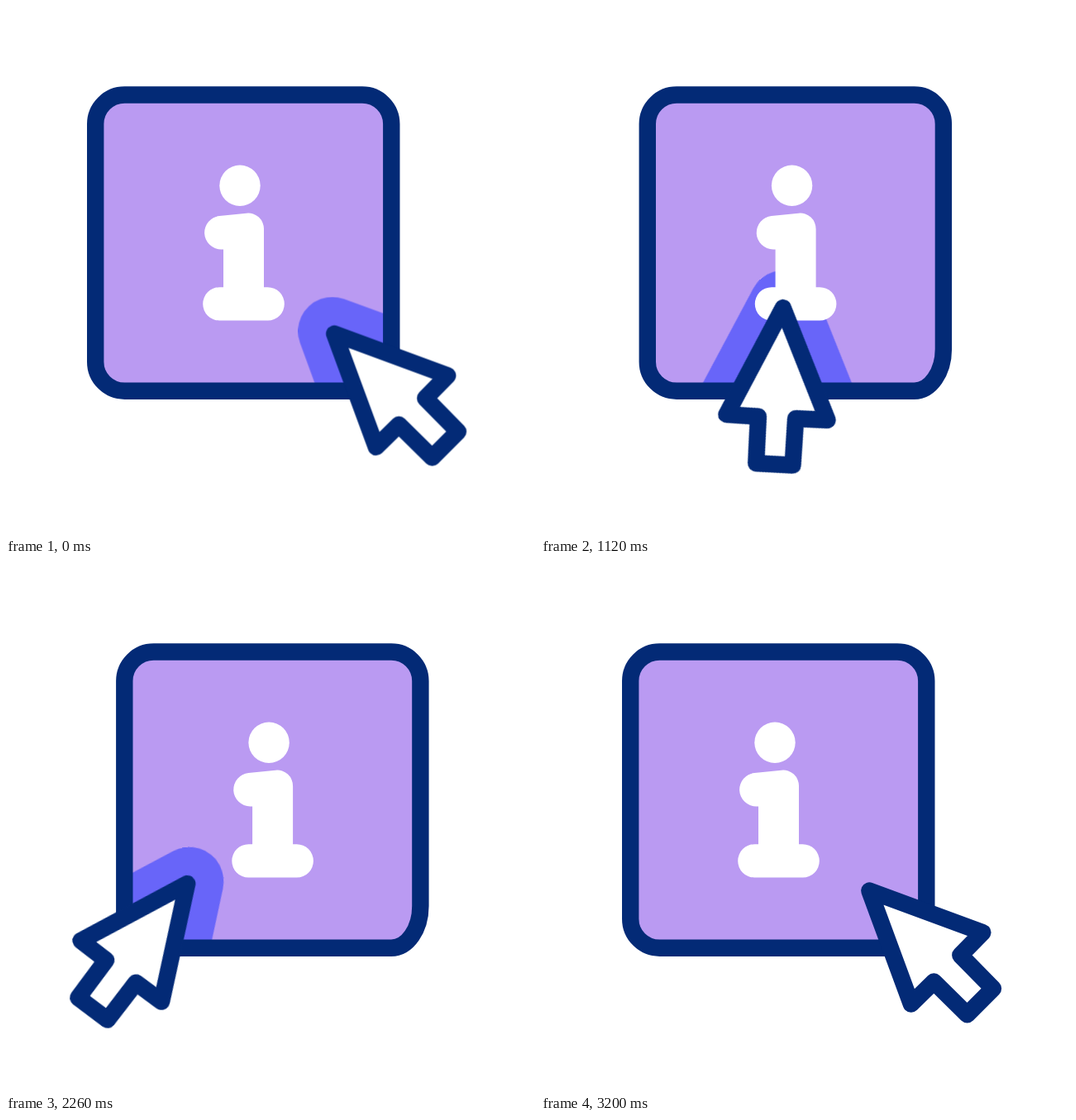
Write an HTML page without scripts that moves like this. It is 640 by 640 pixels and loops after 3.22 s.

```html
<!DOCTYPE html>
<html lang="en">
<head>
<meta charset="utf-8">
<title>Info button</title>
<style>
  html, body { margin: 0; width: 100%; height: 100%; overflow: hidden; background: #fff; }
  svg { display: block; width: 100vw; height: 100vh; }

  :root { --ink: #032a76; --soft: cubic-bezier(.333, 0, .667, 1); }
  .box, .icon, .slide, .swing, .arrow, .sparks line, .shade {
    animation: 3220ms linear infinite;
  }

  .outline, .arrow {
    stroke: var(--ink); stroke-width: 20.4; stroke-linejoin: round;
    vector-effect: non-scaling-stroke;
  }
  .box, .icon {
    transform-origin: 338px 338px;
    animation-name: shift, press;
    animation-timing-function: linear, var(--soft);
  }
  .slide { animation-name: slide; }
  .swing { animation-name: turn, lift; }
  .arrow { animation-name: tap; animation-timing-function: var(--soft); }
  .shade { animation-name: blink; }
  .sparks { stroke: #ffcb50; stroke-width: 20.4; stroke-linecap: round; }
  .sparks line { opacity: 0; animation-name: burst, show; }
  .sparks.left line { animation-delay: -1620ms; }

  /* Button */
  @keyframes shift {
    0%, 17.7%, 99.38%, 100% { translate: 0px 0px; }
    49.69%, 67.39% { translate: 38.5px 0px; }
  }
  @keyframes press {
    0%, 18.01%, 49.69%, 67.7%, 100% { scale: 1; }
    8.7%, 58.39% { scale: .82; }
  }

  /* Pointer */
  @keyframes slide {
    0%, 17.7%, 99.38%, 100% { translate: 397.3px 396.5px; }
    49.69%, 67.39% { translate: 202px 396.5px; }
  }
  @keyframes turn {
    0%, 17.7%, 99.38%, 100% { rotate: 0deg; }
    49.69%, 67.39% { rotate: 90deg; }
  }
  @keyframes lift {
    0%, 49.69%, 99.38%, 100% { translate: 0px 0px; }
    17.7%, 67.39% { translate: 0px 0px; animation-timing-function: cubic-bezier(.39, .575, .565, 1); }
    33.7%, 83.39% { translate: 0px -31.5px; animation-timing-function: cubic-bezier(.47, 0, .745, .715); }
  }
  @keyframes tap {
    0%, 18.3%, 49.69%, 68%, 100% { scale: 1; }
    8.7%, 58.39% { scale: .862; }
    16.15%, 65.84% { scale: 1.068; }
  }
  @keyframes blink {
    0%, 99.3% { opacity: 1; }
    99.31%, 100% { opacity: 0; }
  }

  /* Click sparks: the outer end leads, the inner end catches up */
  @keyframes burst {
    0%, 8.07% { stroke-dasharray: 0 300; stroke-dashoffset: 0; }
    9.32% { stroke-dasharray: 27 300; stroke-dashoffset: 0; }
    10.87% { stroke-dasharray: 51 300; stroke-dashoffset: -4; }
    12.42% { stroke-dasharray: 52 300; stroke-dashoffset: -24; }
    13.66% { stroke-dasharray: 41.5 300; stroke-dashoffset: -46.5; }
    15.22% { stroke-dasharray: 21.3 300; stroke-dashoffset: -76; }
    16.61% { stroke-dasharray: 5 300; stroke-dashoffset: -95; }
    17.7%, 100% { stroke-dasharray: 1 300; stroke-dashoffset: -99; }
  }
  @keyframes show {
    0%, 8.07% { opacity: 0; }
    8.08%, 17.4% { opacity: 1; }
    17.41%, 100% { opacity: 0; }
  }
</style>
</head>
<body>
<svg viewBox="0 0 640 640" fill="none">
  <defs>
    <path id="tile" d="M143.500 107.500H431a35.300 35.300 0 0 1 35.300 35.300V415A35.300 50.700 0 0 1 431 465.700H143.500a35.300 35.300 0 0 1-35.300-35.300V142.800a35.300 35.300 0 0 1 35.300-35.300z"/>
    <clipPath id="inside">
      <path class="box" d="M143.500 107.500H431a35.300 35.300 0 0 1 35.300 35.300V415A35.300 50.700 0 0 1 431 465.700H143.500a35.300 35.300 0 0 1-35.300-35.300V142.800a35.300 35.300 0 0 1 35.300-35.300z"/>
    </clipPath>
  </defs>

  <g class="box" fill="#ba9af2"><use href="#tile"/></g>

  <g clip-path="url(#inside)">
    <g class="slide"><g class="swing">
      <path class="shade" d="M62.500 175L-2.500-3 175.500 62z" fill="#6865f9" stroke="#6865f9" stroke-width="83" stroke-linejoin="round"/>
    </g></g>
  </g>

  <g class="icon" fill="#fff">
    <circle cx="283" cy="217.200" r="24.700"/>
    <path d="M263 294.400H260.300a20.200 20.200 0 0 1-2-40.300L291 250.700A19 19 0 0 1 312 270V340.200H316.600a20.200 20.200 0 0 1 0 40.400H258.400a20.200 20.200 0 0 1 0-40.400H263z"/>
  </g>

  <g class="box"><use class="outline" href="#tile"/></g>

  <g class="sparks">
    <line pathLength="100" x1="487.300" y1="349.300" x2="487.300" y2="308.300"/>
    <line pathLength="100" x1="530" y1="365.500" x2="559" y2="336.500"/>
    <line pathLength="100" x1="546.800" y1="407.700" x2="587.800" y2="407.700"/>
  </g>
  <g class="sparks left">
    <line pathLength="100" x1="140" y1="335.700" x2="140" y2="294.700"/>
    <line pathLength="100" x1="98" y1="352.500" x2="69" y2="323.500"/>
    <line pathLength="100" x1="82.900" y1="394.300" x2="41.900" y2="394.300"/>
  </g>

  <g class="slide"><g class="swing">
    <path class="arrow" fill="#fff" d="M0 0L137 50.500 110 78 149.700 118.300 118.300 149.700 78 110 50.500 137z"/>
  </g></g>
</svg>
</body>
</html>
```
